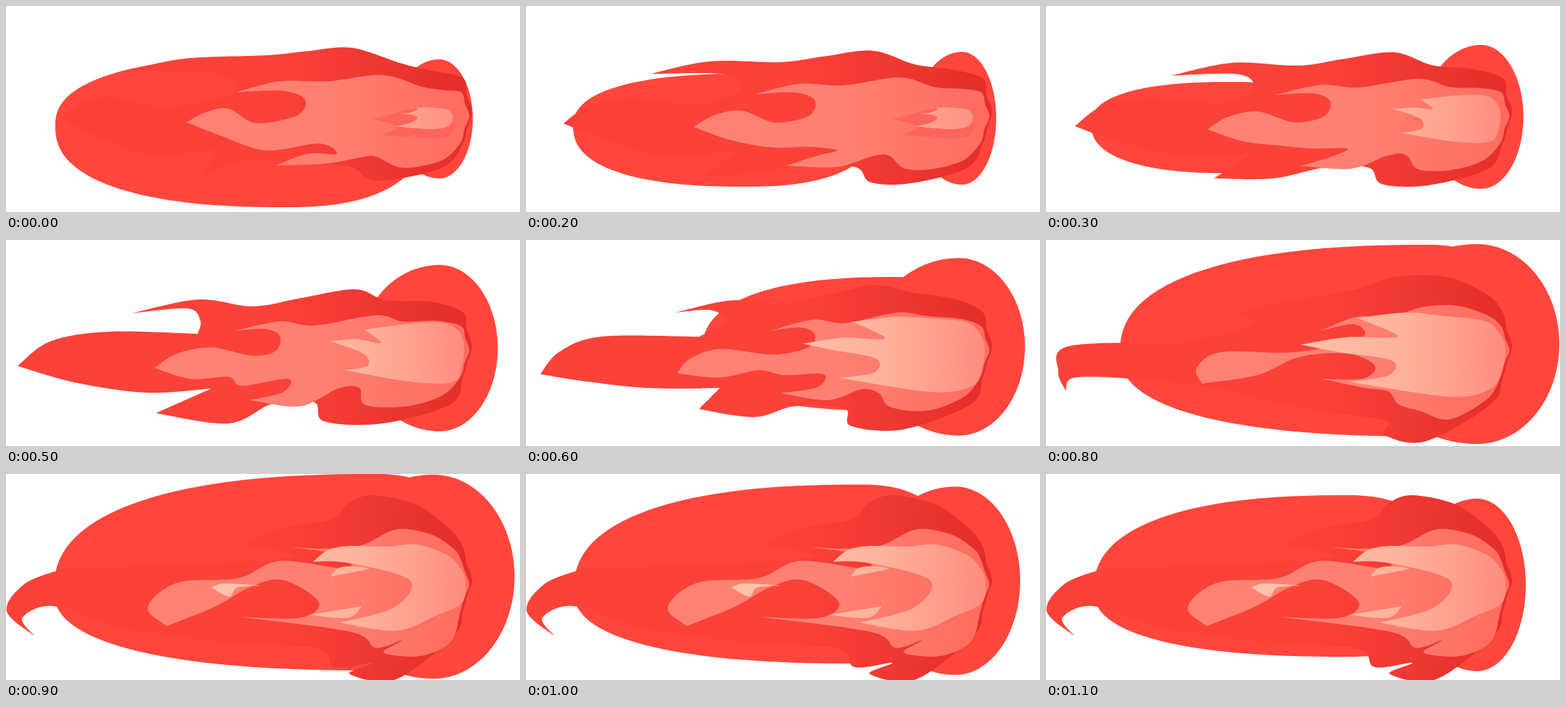
An HTML page that plays this animation: 751 by 301 pixels, repeating every 1.2 s.

```html
<!DOCTYPE html>
<html lang="en">
<head>
<meta charset="utf-8">
<title>Flame</title>
<style>
  html, body { margin: 0; width: 100%; height: 100%; overflow: hidden; background: #fff; }
  svg { display: block; width: 751px; height: 301px; }
</style>
</head>
<body>
<svg id="stage" viewBox="0 0 751 301">
  <defs>
    <linearGradient id="red" gradientUnits="userSpaceOnUse" x1="400" x2="680">
      <stop offset="0" stop-color="#fa4238"/>
      <stop offset=".4" stop-color="#f13933"/>
      <stop offset="1" stop-color="#e42d2a"/>
    </linearGradient>
    <linearGradient id="salmon" gradientUnits="userSpaceOnUse" x1="220" x2="670">
      <stop offset="0" stop-color="#ff8275"/>
      <stop offset=".55" stop-color="#ff8072"/>
      <stop offset="1" stop-color="#ff6b5f"/>
    </linearGradient>
    <linearGradient id="peach" gradientUnits="userSpaceOnUse" x1="370" x2="672">
      <stop offset="0" stop-color="#ffc2a8"/>
      <stop offset=".5" stop-color="#ffb29b"/>
      <stop offset="1" stop-color="#ff8d7f"/>
    </linearGradient>
  </defs>
</svg>
<script>
const STEP = 100, STEPS = 12;

const lerp = (a, b, k) => a + (b - a) * k;
const linear = k => k;
const easeOut = k => 1 - (1 - k) ** 2.8;

// Blends the number lists of the two poses around a step; holds at both ends.
function poseAt(poses, step, ease = linear) {
  const keys = Object.keys(poses).map(Number);
  const from = keys.filter(k => k <= step).pop() ?? keys[0];
  const to = keys.find(k => k > step) ?? from;
  const k = to > from ? ease(Math.max(0, step - from) / (to - from)) : 0;
  return poses[from].map((v, i) => lerp(v, poses[to][i], k));
}

// Superellipse with its own radius on each side.
function egg(cx, cy, left, right, up, down, power) {
  const pow = v => Math.sign(v) * Math.abs(v) ** (2 / power);
  const pts = [];
  for (let a = 0; a < 360; a += 2) {
    const x = pow(Math.cos(a * Math.PI / 180)), y = pow(Math.sin(a * Math.PI / 180));
    pts.push(`${cx + x * (x < 0 ? left : right)} ${cy + y * (y < 0 ? up : down)}`);
  }
  return `M${pts.join('L')}Z`;
}

// Closed spline through x,y pairs, broken at the sharp points.
function spline(nums, sharp) {
  const n = nums.length / 2;
  const pt = i => [nums[i % n * 2], nums[i % n * 2 + 1]];
  let d = 'M' + pt(0);
  for (let i = 0; i < n; i++) {
    const b = pt(i), c = pt(i + 1);
    const a = sharp[i] ? b : pt(i + n - 1), e = sharp[(i + 1) % n] ? c : pt(i + 2);
    const out = b.map((v, j) => v + (c[j] - a[j]) / 6);
    const into = c.map((v, j) => v - (e[j] - b[j]) / 6);
    d += `C${out} ${into} ${c}`;
  }
  return d + 'Z';
}

// Key points run clockwise from the left tip; "*" in the first pose marks a sharp point.
function outline(poses, ease) {
  const sharp = Object.values(poses)[0].split(' ').map(s => s.endsWith('*'));
  const nums = {};
  for (const k in poses) nums[k] = poses[k].match(/\d+/g).map(Number);
  return step => spline(poseAt(nums, step, ease), sharp);
}

// The glow is a round head and a long tail: cx, cy and radii.
const head = {
  0: [633, 165, 49, 87], 2: [637, 164, 50, 97], 8: [630, 152, 120, 146],
  9: [625, 150, 118, 149], 11: [630, 162, 71, 126]
};
const tail = {
  0: [410, 175, 338, 204, 102, 119], 2: [320, 176, 251, 190, 77, 88],
  5: [170, 165, 110, 125, 30, 40], 6: [540, 160, 282, 100, 106, 90],
  8: [560, 165, 452, 130, 158, 122], 9: [540, 170, 470, 150, 170, 117],
  11: [440, 170, 370, 150, 139, 97]
};
function glow(step) {
  const [cx, cy, rx, ry] = poseAt(head, step);
  return egg(cx, cy, rx * 1.35, rx, ry, ry, 2) + egg(...poseAt(tail, step), 2.4);
}

// The front edges stay put while the flame streams away to the left.
const bodyRim = '667,105 673,130 681,155 674,178 667,202';
const midRim = '665,126 671,144 677,161 670,180 664,200';

const body = outline({
  0: `80,163* 120,137 165,134 230,150* 330,128 310,100 180,94* 260,77 380,72 440,66 505,61 578,84 620,94 ${bodyRim} 640,235 570,253 530,253 504,235 440,230 340,228 285,250* 310,210* 210,218 130,190`,
  5: `17,184 65,148 150,134 280,137 284,118 265,100 184,107 280,87 360,97 430,85 510,72 555,88 620,90 ${bodyRim} 650,240 550,268 465,265 450,237 390,239 325,268 219,253 300,217 205,223 100,208`,
  8: `29,220 18,193 34,155 200,150 300,125 285,108 285,104 340,91 415,80 460,70 510,54 585,54 645,80 ${bodyRim} 650,240 555,294 495,285 495,264 400,250 350,240 320,235 250,215 130,203 42,201`,
  9: `42,237 1,200 28,160 85,138 230,132 420,122 350,104 400,79 475,66 500,43 535,31 600,45 648,80 ${bodyRim} 655,235 570,300 502,292 535,276 480,282 455,255 330,248 160,225 70,193 24,210`
});
const mid = outline({
  0: `264,170* 290,156 325,150 365,171 425,160 437,137 405,124 336,126* 400,110 470,110 550,101 608,118 640,123 ${midRim} 640,224 600,235 572,235 540,220 520,221 470,230 395,233* 440,216 483,216 458,201 380,211 315,190`,
  5: `217,187 250,166 300,157 360,169 394,162 400,140 378,130 333,133 400,119 450,125 540,110 580,119 630,118 ${midRim} 638,227 585,243 525,241 516,216 485,217 430,243 357,234 405,222 412,203 345,213 325,200 270,203`,
  8: `228,210 220,188 255,164 362,164 448,148 466,135 448,123 400,133 455,112 500,114 550,98 600,96 645,110 ${midRim} 645,232 590,262 547,250 515,240 500,221 465,216 404,203 465,202 480,183 440,166 370,171 310,197`,
  9: `235,222 207,195 250,159 340,152 400,127 496,138 492,119 417,107 465,109 520,104 570,81 620,88 655,110 ${midRim} 650,245 605,266 552,261 578,243 540,254 505,231 344,209 430,210 457,187 405,155 357,165 305,194`
});
const core = outline({
  2: '573,157* 590,156 602,151 598,149* 612,148 630,149 645,151 650,155 653,162 650,172 640,178 615,180 570,176* 590,171 600,165 597,160',
  5: '473,148 510,145 548,150 523,131 560,126 600,121 640,121 660,132 669,152 666,185 652,208 590,207 495,190 528,184 525,168 495,155',
  8: '372,153 440,142 514,141 455,114 525,106 580,111 640,118 660,133 671,155 667,188 650,217 590,229 442,207 500,198 505,176 430,164',
  9: '449,128 467,113 490,106 520,105 560,106 600,103 640,116 660,132 671,155 666,188 626,208 570,229 488,217 567,195 590,155 500,130'
}, easeOut);
const wisp = outline({ 0: '536,165* 575,155* 601,151 650,168 640,192 551,189* 571,176' });
const chips = ['300,166* 320,160 374,163* 338,166 326,179', '442,206* 520,193* 500,210', '474,150* 490,136 530,138']
  .map(points => outline({ 9: points }));

const layers = [
  { fill: '#ff463c', shape: glow },
  { fill: 'url(#red)', shape: body },
  { fill: 'url(#salmon)', shape: mid },
  { fill: '#ff645a', shape: wisp, until: 4 },
  { fill: 'url(#peach)', shape: core },
  { fill: 'url(#peach)', shape: step => chips.map(c => c(step)).join(''), since: 9 }
];

const stage = document.getElementById('stage');
for (const layer of layers) {
  layer.el = document.createElementNS('http://www.w3.org/2000/svg', 'path');
  layer.el.setAttribute('fill', layer.fill);
  stage.append(layer.el);
}

let shown = -1;
const begin = performance.now();
function draw() {
  const step = Math.floor((performance.now() - begin) / STEP) % STEPS;
  if (step !== shown) {
    shown = step;
    for (const { el, shape, since = 0, until = STEPS } of layers) {
      el.setAttribute('d', step >= since && step < until ? shape(step) : '');
    }
  }
  requestAnimationFrame(draw);
}
draw();
</script>
</body>
</html>
```
